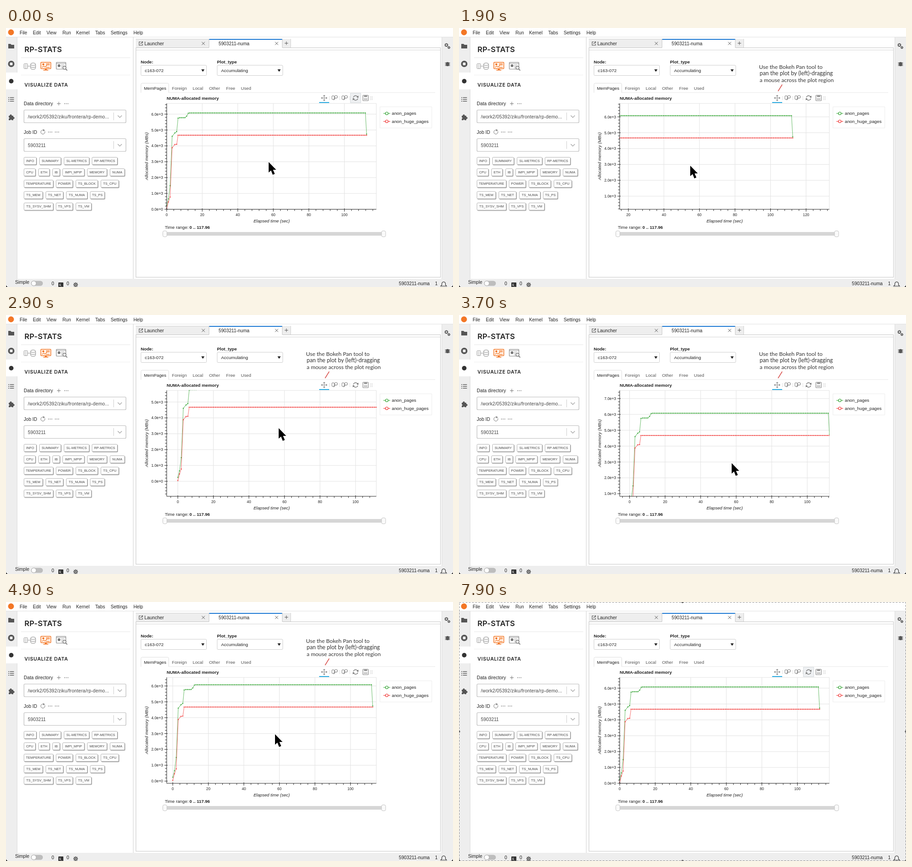
Write an HTML page with a canvas that moves like this. It is 982x570 px and loops after 8000 ms.

```html
<!DOCTYPE html>
<html lang="en">
<head>
<meta charset="utf-8">
<title>NUMA plot panning</title>
<style>
html, body { margin: 0; width: 100%; height: 100%; overflow: hidden; background: #fff; }
canvas { display: block; width: 982px; height: 570px; }
</style>
</head>
<body>
<canvas id="stage" width="982" height="570"></canvas>
<script>
const ctx = document.getElementById('stage').getContext('2d');
const LOOP = 8000, STEP = 100;
const SANS = '"Liberation Sans", Arial, sans-serif';
const INK = '#222', GREY = '#777', ORANGE = '#f37726', BLUE = '#1976d2';
const GREEN = '#2ca02c', RED = '#f0302f';

// ---- drawing helpers
function text(s, x, y, size = 10.2, o = {}) {
  ctx.font = `${o.style || ''} ${size}px ${o.font || SANS}`;
  ctx.fillStyle = o.color || INK;
  ctx.textAlign = o.align || 'left';
  ctx.letterSpacing = (o.gap || 0) + 'px';
  ctx.fillText(s, x, y);
}
function rect(x, y, w, h, color) {
  ctx.fillStyle = color;
  ctx.fillRect(x, y, w, h);
}
function line(pts, color, width = 1, close = false) {
  ctx.beginPath();
  pts.forEach(([x, y]) => ctx.lineTo(x, y));
  if (close) ctx.closePath();
  ctx.strokeStyle = color;
  ctx.lineWidth = width;
  ctx.stroke();
}
function poly(pts, color) {
  ctx.beginPath();
  pts.forEach(([x, y]) => ctx.lineTo(x, y));
  ctx.fillStyle = color;
  ctx.fill();
}
function box(x, y, w, h, r, fill, stroke, width = 1) {
  ctx.beginPath();
  ctx.roundRect(x, y, w, h, r);
  paint(fill, stroke, width);
}
function circle(x, y, r, fill, stroke, width = 1) {
  ctx.beginPath();
  ctx.arc(x, y, r, 0, 7);
  paint(fill, stroke, width);
}
function paint(fill, stroke, width) {
  if (fill) { ctx.fillStyle = fill; ctx.fill(); }
  if (stroke) { ctx.strokeStyle = stroke; ctx.lineWidth = width; ctx.stroke(); }
}
function arc(x, y, r, a, b, color, width = 1) {
  ctx.beginPath();
  ctx.arc(x, y, r, a, b);
  paint(null, color, width);
}
function cross(x, y, r, color = '#555') {
  line([[x - r, y - r], [x + r, y + r]], color);
  line([[x + r, y - r], [x - r, y + r]], color);
}
function plus(x, y, r, color) {
  line([[x - r, y], [x + r, y]], color);
  line([[x, y - r], [x, y + r]], color);
}
function dots(x, y, color = GREY) {
  for (let i = -1; i < 2; i++) circle(x + i * 3.6, y, 0.9, color);
}
function gear(x, y, r) {
  for (let i = 0; i < 8; i++) {
    const c = Math.cos(i * Math.PI / 4), s = Math.sin(i * Math.PI / 4);
    line([[x + c * r * .6, y + s * r * .6], [x + c * r * 1.3, y + s * r * 1.3]], '#555', 1.4);
  }
  circle(x, y, r * .8, null, '#555', 1.5);
}

// ---- application frame
function shell() {
  rect(0, 0, 982, 570, '#fff');
  rect(0, 20, 24, 533, '#eeeeee');
  rect(958, 20, 24, 533, '#eeeeee');
  rect(0, 552, 982, 18, '#eeeeee');
  rect(0, 19.5, 982, 1, '#e0e0e0');
  rect(24, 20, 1, 532, '#dcdcdc');
  rect(279, 20, 1, 532, '#d0d0d0');
  rect(957, 20, 1, 532, '#dcdcdc');
  rect(0, 98, 25, 37, '#fff');

  circle(11, 9.5, 6.5, ORANGE);
  const menu = { File: 30, Edit: 59, View: 89, Run: 124, Kernel: 154, Tabs: 196, Settings: 230, Help: 280 };
  for (const name in menu) text(name, menu[name], 13.5);

  poly([[5, 35], [10, 35], [12, 37], [18, 37], [18, 45], [5, 45]], '#555');
  circle(11.5, 79, 7, '#555');
  box(8.5, 76, 6, 6, 1, '#eee');
  circle(11.5, 117, 5, '#333');
  for (let y = 153; y < 163; y += 4) {
    rect(5, y - .5, 2, 1.4, '#555');
    rect(8.5, y - .5, 9, 1.4, '#555');
  }
  box(6, 193, 10, 10, 1, '#555');
  circle(10.5, 192.5, 2.2, '#555');
  circle(16.5, 198, 2.2, '#555');
  circle(6, 198, 1.6, '#eee');
  circle(11, 203, 1.6, '#eee');

  gear(967.5, 37.5, 3.2);
  gear(973, 43, 2.2);
  box(966.5, 75, 7, 9, 3, '#555');
  for (const y of [76, 79, 82]) rect(964.5, y, 11, 1.2, '#555');

  text('Simple', 20, 562.5);
  box(55, 556.5, 26, 11, 5.5, '#bdbdbd');
  circle(61, 562, 5.3, '#fff', '#aaa');
  text('0', 100, 566);
  box(115, 560, 11, 10, 1, '#333');
  text('$_', 117, 568, 6.5, { color: '#fff' });
  text('0', 133, 566);
  gear(153, 565, 4);
  circle(153, 565, 1.4, '#444');
  text('5903211-numa', 863, 566);
  text('1', 942.5, 566);
  line([[955, 568], [957.5, 565.5], [957.5, 562], [959, 559.5], [961.5, 558.5], [964, 559.5], [965.5, 562], [965.5, 565.5], [968, 568]], '#333', 1.1, true);
  for (const [x, d] of [[0, 1], [982, -1]]) poly([[x, 566], [x + d * 1.5, 568.5], [x + d * 4, 570], [x, 570]], '#222');
}

// ---- left panel
const BUTTONS = [
  ['INFO', 39, 67, 'SUMMARY', 73, 121, 'SL-METRICS', 127, 183, 'RP-METRICS', 188.5, 245],
  ['CPU', 39, 65, 'ETH', 71, 96, 'IB', 102, 118.5, 'IMPI_MPIP', 124, 172.5, 'MEMORY', 178, 222, 'NUMA', 228, 261],
  ['TEMPERATURE', 39, 104, 'POWER', 109.5, 147, 'TS_BLOCK', 153, 202, 'TS_CPU', 208, 248],
  ['TS_MEM', 39, 81, 'TS_NET', 87, 126, 'TS_NUMA', 132, 179, 'TS_PS', 184.5, 217],
  ['TS_SYSV_SHM', 39, 104, 'TS_VFS', 109.5, 147, 'TS_VM', 153, 188]
];
function field(y, label) {
  box(39.5, y + .5, 224, 28, 2, '#fff', '#bbb', 1.2);
  rect(236, y + 6, 1, 17, '#ccc');
  line([[245.5, y + 12.5], [250, y + 17], [254.5, y + 12.5]], '#aaa', 1.5);
  text(label, 48, y + 18.5, 10.3, { color: '#444', gap: label.length > 10 ? .2 : 0 });
}
function panel() {
  text('RP-STATS', 40.5, 53, 16.5, { style: '600', font: 'Inter, sans-serif', gap: .2 });
  rect(33, 65, 240, 1, '#e6e6e6');
  rect(33, 103, 240, 1, '#eeeeee');

  box(39.5, 78.5, 8, 11, 1, '#fff', '#999');
  for (const y of [81, 84, 87]) rect(41.5, y, 4, 1, '#aaa');
  line([[48, 84], [53, 84]], '#999');
  box(54, 77, 11, 14, 4, '#fff', '#888');
  for (const y of [81, 85.5]) line([[54, y], [57, y + 1.2], [62, y + 1.2], [65, y]], '#888');

  box(76.5, 75.5, 22, 14, 1, '#fff4ec', ORANGE, 1.5);
  circle(82, 80, 2.2, ORANGE);
  line([[79, 86.5], [83, 84], [86, 86], [90, 82]], ORANGE, 1.2);
  for (const y of [78, 80.5, 86]) rect(88, y, 8, 1.3, ORANGE);
  rect(85.5, 90, 4, 2, ORANGE);
  rect(82, 92, 11, 1.5, ORANGE);

  box(110.5, 75.5, 21, 15, 1, '#fff', '#888', 1.2);
  rect(110, 77.5, 22, 1, '#888');
  circle(116.5, 83, 3, '#777');
  for (const y of [81, 84, 87]) rect(121, y, 7, 1, '#aaa');
  circle(128.5, 87.5, 3.4, '#fff', '#666', 1.2);
  line([[131, 90], [134.5, 93.5]], '#666', 1.6);

  text('VISUALIZE DATA', 40.5, 129, 10.7, { style: '600', font: 'Inter, sans-serif', gap: .7 });
  text('Data directory', 39, 170, 10.3);
  plus(116, 166.5, 4, GREY);
  dots(132.5, 166.5);
  field(180, '/work2/05392/ziku/frontera/rp-demo...');
  text('Job ID', 39, 233, 10.1);
  arc(81, 229, 4.5, -.4, 5.1, GREY);
  poly([[82, 222.5], [85.5, 225.5], [81.5, 227]], GREY);
  dots(97, 229);
  dots(112, 229);
  field(243, '5903211');

  BUTTONS.forEach((row, r) => {
    const y = 284 + r * 25.1;
    for (let i = 0; i < row.length; i += 3) {
      const [s, a, b] = row.slice(i, i + 3);
      box(a + 1, y + 1.2, b - a, 17, 2.5, '#aaa');
      box(a + .5, y + .5, b - a - 1, 16, 2, '#fff', '#aaa', .9);
      text(s, (a + b) / 2, y + 11, 7.4, { align: 'center', color: '#444' });
    }
  });
}

// ---- document area
function select(x, label, value) {
  text(label, x, 77.5, 9.7, { style: 'bold' });
  box(x + .5, 82, 144, 22.5, 2, '#fff', '#ccc');
  text(value, x + 9, 97, 9.9);
  poly([[x + 133, 91], [x + 140, 91], [x + 136.5, 96.5]], '#222');
}
function dock() {
  rect(285, 24, 1, 525, '#c4c4c4');
  rect(285, 24, 161, 19, '#eeeeee');
  rect(285, 24, 161, 1, '#d0d0d0');
  rect(285, 43, 161, 1, '#c4c4c4');
  rect(607, 43, 348, 1, '#c4c4c4');
  rect(607, 24, 19, 19, '#eeeeee');
  rect(625, 24, 1, 19, '#d0d0d0');
  rect(446, 24, 161, 2, BLUE);
  rect(445.5, 24, 1, 19, '#c4c4c4');
  rect(606.5, 24, 1, 19, '#c4c4c4');
  rect(286, 48, 669, 1, '#d4d4d4');
  rect(954, 43, 1, 506, '#c4c4c4');
  rect(285, 548, 670, 1, '#c4c4c4');
  line([[296, 30.5], [292.5, 30.5], [292.5, 38], [300, 38], [300, 34.5]], '#555', 1.1);
  line([[295.5, 35], [300, 30.5]], '#555', 1.1);
  line([[297.5, 30.3], [300.3, 30.3], [300.3, 33]], '#555', 1.1);
  text('Launcher', 304, 37.5, 10.3);
  text('5903211-numa', 467, 37.5);
  cross(433.5, 34, 3.3);
  cross(594.5, 34, 3.3);
  plus(616, 33.5, 3.8, '#555');

  select(296, 'Node:', 'c163-072');
  select(463.5, 'Plot_type', 'Accumulating');

  rect(296, 141.5, 647, 1, '#e8e8e8');
  box(296.5, 121.5, 61, 20.5, [3, 3, 0, 0], '#fff', '#ddd');
  rect(297, 141, 60, 2, '#fff');
  const tabs = { MemPages: 303, Foreign: 364.5, Local: 410, Other: 446, Free: 483.5, Used: 516 };
  for (const name in tabs) text(name, tabs[name], 135.5, 9.7, { color: name === 'MemPages' ? INK : '#555' });

  text('Time range:', 349, 442, 9.8);
  text('0 .. 117.96', 403, 442, 9.6, { style: 'bold' });
  box(349, 449, 481, 8, 2, '#d6d6d6');
  for (const x of [349, 829.5]) box(x - 4.5, 446.5, 9, 13, 3, '#fafafa', '#c4c4c4');
}

function zoomIcon(x) {
  box(x - 6, 149, 5, 8.5, 2.5, null, '#888', 1.1);
  circle(x + 3, 151.5, 3, null, '#888', 1.2);
  line([[x + 1, 154], [x - 2, 158.5]], '#888', 1.5);
}
function toolbar(lit) {
  if (lit) box(756.5, 143.5, 23, 21, 0, '#eef0f2', '#d8dde0');
  plus(699, 154, 5.5, '#888');
  for (const [dx, dy] of [[1, 0], [-1, 0], [0, 1], [0, -1]]) {
    const x = 699 + dx * 7, y = 154 + dy * 7;
    poly([[x, y], [x - dx * 3 + dy * 2.5, y - dy * 3 + dx * 2.5], [x - dx * 3 - dy * 2.5, y - dy * 3 - dx * 2.5]], '#888');
  }
  rect(688, 163, 22, 2, '#26aae1');
  for (const x of [710, 732.5, 755]) for (const y of [151, 154, 157]) rect(x, y, 1, 1, '#aaa');
  zoomIcon(722);
  zoomIcon(744);
  arc(768, 154, 5, 3.4, 5.8, '#777', 1.3);
  arc(768, 154, 5, .25, 2.65, '#777', 1.3);
  poly([[774.5, 149], [774, 154], [770, 152]], '#777');
  poly([[761.5, 159], [762, 154], [766, 156]], '#777');
  box(784, 148, 12, 12, 1, null, '#888', 1.2);
  rect(786.5, 148, 7, 4, '#999');
  rect(786, 155, 8, 1, '#999');
  rect(786, 157, 8, 1, '#999');
  for (const x of [801, 804]) for (const y of [151, 154, 157]) rect(x, y, 1, 1, '#888');
}

// ---- plot; series points are pixel offsets from the data origin
const L = 353, R = 813.5, T = 166, B = 399, KX = 3.904, KY = 34.9;
const run = (from, to, y) => {
  const n = Math.round((to - from) / 3.85);
  return Array.from({ length: n + 1 }, (_, i) => [from + (to - from) * i / n, y]);
};
const greenPts = [[0, 8.5], [3.7, 23], [7.5, 52], [12, 160.5], [18, 168], [22, 171], [25, 200.5],
  ...run(28.8, 40, 201.5), [44, 205], [47.5, 211.5], ...run(51, 436.5, 212), [439.2, 165.5]];
const redPts = [[0, 1.5], [3.7, 16], [7.5, 27], [12, 135.5], [18, 142.5], [22, 143], ...run(25, 439.2, 163)];

function series(pts, ox, oy, color) {
  const p = pts.map(([x, y]) => [ox + x, oy - y]);
  ctx.globalAlpha = .65;
  line(p, color, 1.1);
  ctx.globalAlpha = 1;
  p.forEach(([x, y]) => circle(x, y, 1.15, color));
}
function plot(px, py) {
  const ox = L + px, oy = B + py;
  const xs = [], ys = [];
  for (let v = -40; v <= 160; v += 4) {
    const x = ox + v * KX;
    if (x >= L - .1 && x <= R) xs.push([v, x]);
  }
  for (let v = -10; v <= 50; v++) {
    const y = oy - v * KY / 5;
    if (y <= B + .1 && y >= T) ys.push([v, y]);
  }
  line([[L, T], [R, T], [R, B]], '#e2e2e2');
  for (const [v, x] of xs) if (v % 20 === 0) line([[x, T], [x, B]], '#e2e2e2');
  for (const [v, y] of ys) if (v % 5 === 0) line([[L, y], [R, y]], '#e2e2e2');

  ctx.save();
  ctx.beginPath();
  ctx.rect(L - 1, T - .5, R - L + 1.5, B - T + 1);
  ctx.clip();
  series(greenPts, ox, oy, GREEN);
  series(redPts, ox, oy, RED);
  ctx.restore();

  line([[L, T], [L, B], [R, B]], '#222');
  for (const [v, x] of xs) {
    const major = v % 20 === 0;
    line([[x, B - (major ? 2 : 0)], [x, B + (major ? 5 : 3.5)]], '#222');
    if (major) text(v, x, 413.5, 8.3, { align: 'center' });
  }
  for (const [v, y] of ys) {
    const major = v % 5 === 0;
    line([[L + (major ? 2 : 0), y], [L - (major ? 5 : 3.5), y]], '#222');
    if (major) text((v / 5).toFixed(1) + (v ? 'e+3' : 'e+0'), 345, y + 3, 8.4, { align: 'right' });
  }

  text('NUMA-allocated memory', L, 157.5, 9.7, { style: 'bold' });
  text('Elapsed time (sec)', 583.5, 428, 9.65, { style: 'italic', align: 'center' });
  ctx.save();
  ctx.translate(311.5, 282);
  ctx.rotate(-Math.PI / 2);
  text('Allocated memory (MBs)', 0, 0, 9.6, { style: 'italic', align: 'center' });
  ctx.restore();

  box(821.5, 173.5, 114, 46.5, 0, '#fff', '#ececec');
  [['anon_pages', GREEN, 188], ['anon_huge_pages', RED, 205.5]].forEach(([s, c, y]) => {
    line([[829, y], [844, y]], c);
    circle(836.5, y, 3, '#fff', c, 1.2);
    text(s, 847.5, y + 3.2, 9.75);
  });
}

// ---- notes and pointers
const NOTE = { font: 'Lato, sans-serif', color: '#333' };
function panNote() {
  text('Use the Bokeh Pan tool to', 659, 89.5, 12.2, NOTE);
  text('pan the plot by (left)-dragging', 660.5, 104, 12.4, NOTE);
  text('a mouse across the plot region', 660.5, 118.5, 12.2, NOTE);
  line([[710, 124.5], [701, 139]], '#d9534f', 1.6);
}
function resetNote() {
  text('Click to reset the plot', 714, 116.5, 13.5, NOTE);
  line([[778, 122.5], [768.5, 139]], '#e8403a', 1.6);
}
function outlined(pts, fill, stroke, width) {
  ctx.lineJoin = 'round';
  line(pts, stroke, width, true);
  poly(pts, fill);
  ctx.lineJoin = 'miter';
}
function arrow(x, y) {
  const shape = [[0, 0], [0, 23], [5.2, 18.5], [9, 28], [13.5, 26], [9.6, 17], [16.5, 17]];
  outlined(shape.map(([a, b]) => [x + a, y + b]), '#000', '#fff', 2.5);
}
function hand(x, y) {
  const shape = [[-1, 0], [2, 0], [6, 10], [9, 8.5], [11, 9.5], [14, 8.5], [16, 10], [18, 11],
    [18, 18], [16, 25], [5, 25], [0, 19], [-6, 14], [-5, 11], [-2, 12], [1, 14], [-2, 3]];
  outlined(shape.map(([a, b]) => [x + a, y + b]), '#fff', '#111', 2.8);
  for (const dx of [7, 10.5, 14]) line([[x + dx, y + 16], [x + dx, y + 21]], '#111', 1.2);
}
function selection() {
  ctx.setLineDash([4, 3]);
  line([[.5, .5], [981.5, .5], [981.5, 569.5], [.5, 569.5]], '#888', 1, true);
  ctx.setLineDash([]);
  for (const [x, y] of [[491, 0], [491, 570], [0, 285], [982, 285]]) circle(x, y, 2.5, '#666');
}

// time, pointer x, pointer y, pan x, pan y
const KEYS = [
  [0, 577, 295, 0, 0], [700, 577, 295, 0, 0], [1900, 508, 303, -59, 6], [2100, 499, 301, -72, 5],
  [2900, 599, 249, 24.5, -33], [3100, 601, 243, 25, -46], [3700, 599, 326, 21.7, 29.2],
  [3900, 598, 331, 21, 35], [4500, 591, 291, 13.4, -4.8], [4900, 591, 291, 13.4, -4.8],
  [5700, 780, 165, 13.4, -4.8], [8000, 780, 165, 13.4, -4.8]
];
function slope(i, c) {
  const a = KEYS[i - 1], k = KEYS[i], b = KEYS[i + 1];
  if (!a || !b || a[c] === k[c] || b[c] === k[c]) return 0;
  return (b[c] - a[c]) / (b[0] - a[0]);
}
function track(t, c) {
  let i = 0;
  while (KEYS[i + 1][0] <= t) i++;
  const a = KEYS[i], b = KEYS[i + 1], d = b[0] - a[0], u = (t - a[0]) / d;
  const s = u * u * (3 - 2 * u);
  return a[c] + (b[c] - a[c]) * s + d * u * (1 - u) * (slope(i, c) * (1 - u) - slope(i + 1, c) * u);
}

function draw(t) {
  const reset = t >= 6000;
  const x = track(t, 1), y = track(t, 2);
  shell();
  panel();
  dock();
  toolbar(t < 700 || t >= 5600);
  plot(reset ? 0 : track(t, 3), reset ? 0 : track(t, 4));
  if (t >= 600 && t < 5100) panNote();
  if (t >= 5200 && t < 7200) resetNote();
  if (t < 5600) arrow(x, y);
  else if (t < 7200) hand(x, y);
  if (t >= 7900) selection();
}

const start = performance.now();
function tick(now) {
  const t = Math.max(0, now - start) % LOOP;
  draw(Math.floor(t / STEP) * STEP);
  requestAnimationFrame(tick);
}
draw(0);
requestAnimationFrame(tick);
</script>
</body>
</html>
```
